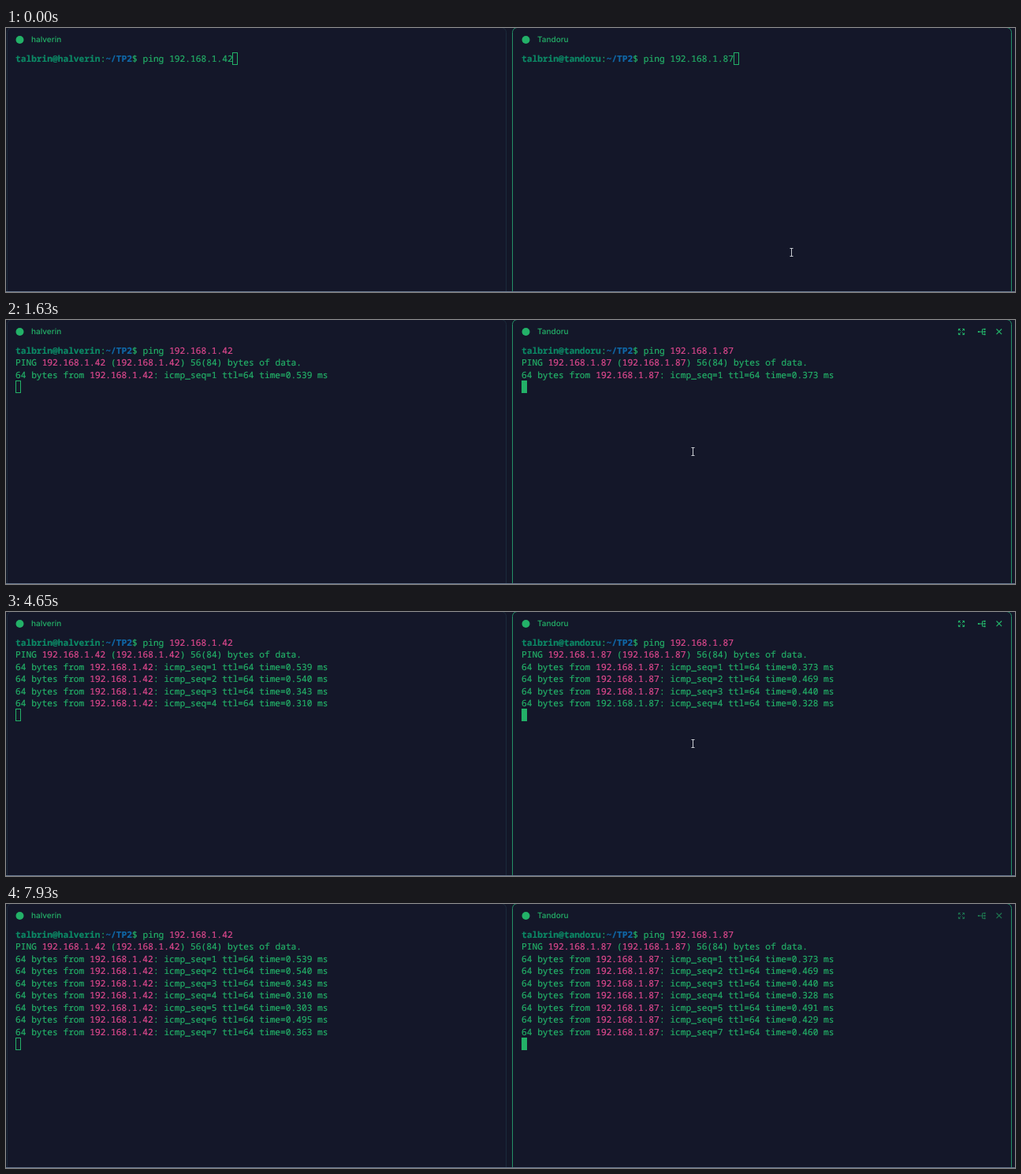
An HTML page for the animation above (7.99 s loop, 1280 by 336 pixels).

```html
<!DOCTYPE html>
<html lang="en">
<head>
<meta charset="utf-8">
<title>Two terminals</title>
<style>
html, body { margin: 0; width: 100%; height: 100%; overflow: hidden; background: #131627; }
svg { display: block; width: 1280px; height: 336px; }
text { white-space: pre; text-rendering: geometricPrecision; }
.mono { font: 11.2px "Noto Sans Mono", "DejaVu Sans Mono", monospace; stroke-width: .2; }
.bold { font-weight: 700; }
.title { font: 500 10px Inter, Roboto, sans-serif; }
</style>
</head>
<body>
<svg id="stage" viewBox="0 0 1280 336"></svg>
<script>
const LOOP = 7990;
const CELL = 6.73, LINE = 15.45, TOP = 31, LEFT = 12;
const GREEN = '#23b168', TEAL = '#0c8a66', BLUE = '#1068a8', PINK = '#e0498f';
const FOCUS = '#249168', DIM = '#1b2b3b', PANE = '#141729';

// Each reply is [shown at, address coloured at, round trip].
const panes = [
  {
    x: 0, edge: 1.5, title: 'halverin', host: 'halverin', ip: '192.168.1.42',
    enter: 820, output: 890, tint: 960,
    focus: [[400, 960]], solid: [400, 960], hover: [340, 960],
    replies: [
      [890, 1030, '0.539'], [1890, 1950, '0.540'], [2820, 2890, '0.343'],
      [3850, 3920, '0.310'], [4850, 4990, '0.303'], [5850, 5990, '0.495'],
      [7110, 7170, '0.363']
    ]
  },
  {
    x: 642, edge: 642.5, title: 'Tandoru', host: 'tandoru', ip: '192.168.1.87',
    enter: 1360, output: 1500, tint: 1500,
    focus: [[0, 400], [960, LOOP]], solid: [960, LOOP], hover: [960, 7930], fade: 7930,
    replies: [
      [1500, 1630, '0.373'], [2480, 2620, '0.469'], [3780, 3780, '0.440'],
      [4650, 4780, '0.328'], [5510, 5650, '0.491'], [6590, 6720, '0.429'],
      [7520, 7590, '0.460']
    ]
  }
];

// Pointer positions, held until the next time.
const pointer = [
  [0, 996, 285], [70, 975, 277], [140, 922, 257], [200, 850, 233],
  [270, 765, 207], [340, 685, 187], [400, 630, 174], [470, 602, 170],
  [540, 594, 169], [740, 602, 170], [820, 630, 170], [890, 694, 169],
  [960, 775, 168], [1030, 843, 167], [1100, 871, 167],
  [7590, 905, 207], [7660, 985, 287], [7740, -50, -50]
];

const within = (t, [from, to]) => t >= from && t < to;

function write(row, parts) {
  const y = Math.round(TOP + row * LINE + 12);
  let col = 0;
  return parts.map(([str, color = GREEN, bold]) => {
    const x = LEFT + col * CELL;
    col += str.length;
    return `<text class="mono${bold ? ' bold' : ''}" x="${x}" y="${y}" fill="${color}" stroke="${color}">${str}</text>`;
  }).join('');
}

function cursor(row, col, solid) {
  const x = Math.floor(LEFT + col * CELL), y = Math.floor(TOP + row * LINE);
  return solid
    ? `<rect x="${x}" y="${y}" width="7" height="16" fill="${GREEN}"/>`
    : `<rect x="${x + .5}" y="${y + .5}" width="6" height="15" fill="none" stroke="${GREEN}"/>`;
}

function icons(opacity) {
  const arrows = [0, 90, 180, 270].map(a =>
    `<path d="M-.8-.8L-3-3M-3.6-1.6V-3.6H-1.6Z" fill="${GREEN}" transform="translate(570 15) rotate(${a})"/>`).join('');
  return `<g fill="none" stroke="${GREEN}" opacity="${opacity}">${arrows}
    <path d="M591.5 15H596M600 11.8H596.5V18.2H600M596.5 15H600"/>
    <path d="M590.9 15h2M598.6 11.8h2M598.6 15h2M598.6 18.2h2" stroke-width="2"/>
    <path d="M614.5 11.5l6.6 6.6m0-6.6l-6.6 6.6" stroke-width="1.2"/></g>`;
}

function terminal(p, t) {
  const tinted = at => t >= at ? PINK : GREEN;
  const prompt = `talbrin@${p.host}`;
  let out = write(0, [
    [prompt, TEAL, true], [':'], ['~/TP2', BLUE, true],
    ['$ ping '], [p.ip, tinted(p.tint)]
  ]);
  let row = 0, col = 0;
  if (t < p.enter) col = prompt.length + 13 + p.ip.length;
  else row = 1;
  if (t >= p.output) {
    const color = tinted(p.replies[0][1]);
    out += write(1, [['PING '], [p.ip, color], [' ('], [p.ip, color], [') 56(84) bytes of data.']]);
    row = 2;
  }
  p.replies.forEach(([shown, tint, ms], i) => {
    if (t < shown) return;
    out += write(row++, [
      ['64 bytes from '], [p.ip, tinted(tint)],
      [`: icmp_seq=${i + 1} ttl=64 time=${ms} ms`]
    ]);
  });
  return out + cursor(row, col, within(t, p.solid));
}

function pane(p, t) {
  const focused = p.focus.some(span => within(t, span));
  const iconLevel = within(t, p.hover) ? 1 : t >= p.fade ? .6 : 0;
  return `<rect x="${p.edge}" y="-.5" width="633" height="345" rx="6" fill="${PANE}" stroke="${focused ? FOCUS : DIM}"/>
    <g transform="translate(${p.x})">
    <circle cx="17.5" cy="15" r="5" fill="${GREEN}"/>
    <text class="title" x="32" y="18.3" fill="${GREEN}">${p.title}</text>
    ${iconLevel ? icons(iconLevel) : ''}${terminal(p, t)}</g>`;
}

function beam(t) {
  const [, x, y] = pointer.filter(k => k[0] <= t).pop();
  return `<path transform="translate(${x + .5} ${y + .5})" fill="none" stroke="#c9ccd2"
    d="M-2-5H2M0-5V5M-2 5H2"/>`;
}

const stage = document.getElementById('stage');
const start = performance.now();
let last = '';

function draw(now) {
  const t = Math.max(0, now - start) % LOOP;
  const markup = '<rect width="1280" height="336" fill="#131627"/>' +
    panes.map(p => pane(p, t)).join('') +
    '<path d="M0 335.5H1280" stroke="#66758c"/>' + beam(t);
  if (markup !== last) stage.innerHTML = last = markup;
  requestAnimationFrame(draw);
}
draw(start);
</script>
</body>
</html>
```
